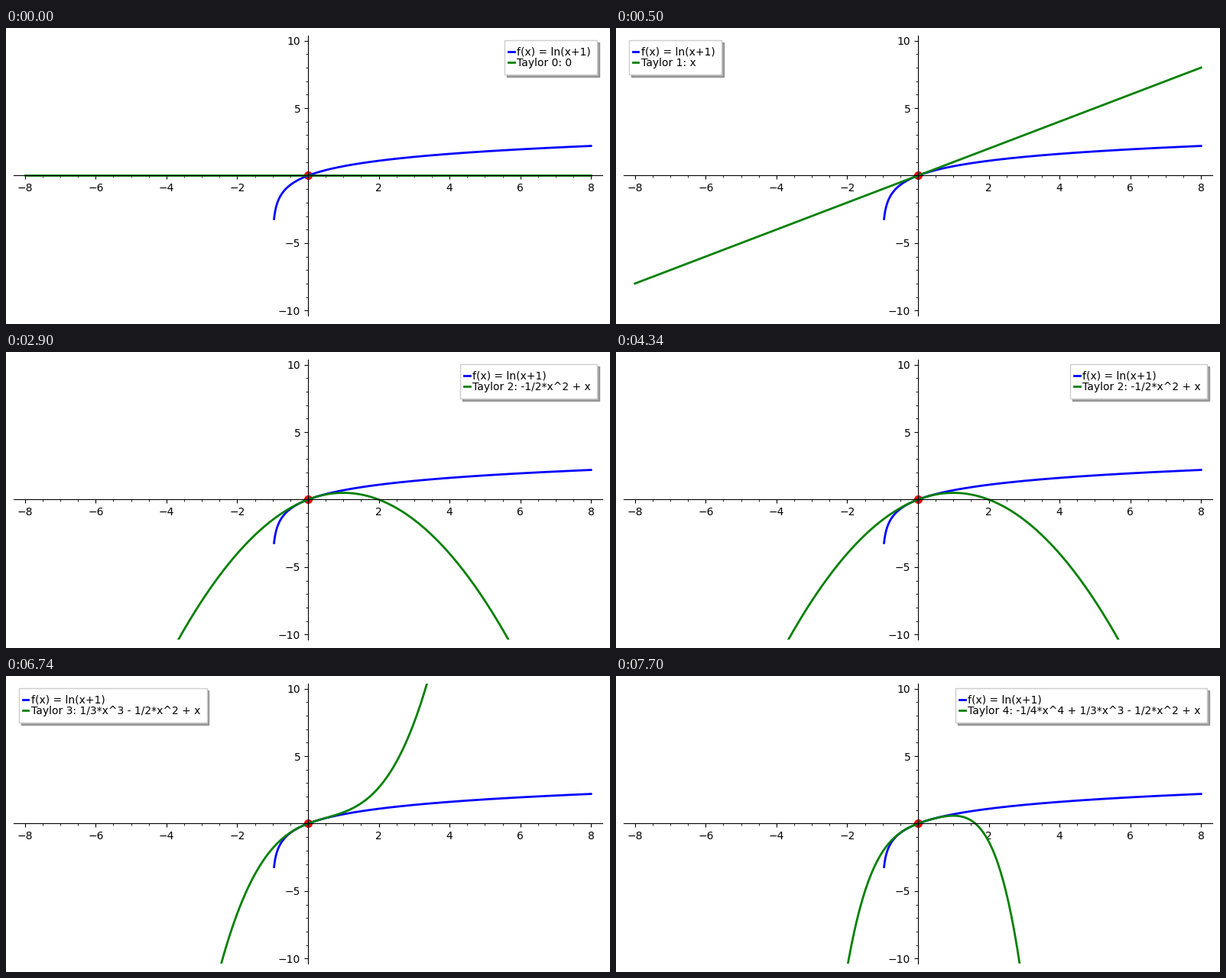
Animation of 790x388 px, one loop 8000 ms. Source, as a matplotlib script:

```python
import numpy as np
import matplotlib.pyplot as plt
from matplotlib.animation import FuncAnimation
from matplotlib.ticker import AutoMinorLocator, MultipleLocator

W, H, DPI = 790, 388, 100
STEP_MS, LOOP_MS = 100, 8000
HOLD_MS, LEAD_MS = 2400, 1900  # time per degree; part of the first hold already past

plt.rcParams["font.family"] = "DejaVu Sans"


def coef(k):
    return (-1) ** (k + 1) / k


def taylor(x, degree):
    return sum((coef(k) * x**k for k in range(1, degree + 1)), np.zeros_like(x))


def formula(degree):
    """Polynomial as text, highest power first."""
    text = ""
    for k in range(degree, 0, -1):
        term = "x" if k == 1 else f"1/{k}*x^{k}"
        negative = coef(k) < 0
        if text:
            text += (" - " if negative else " + ") + term
        else:
            text = "-" * negative + term
    return text or "0"


def tick_label(value, _):
    return f"{value:g}".replace("-", "\u2212") if value else ""


def setup_axis(axis, step):
    axis.set_major_locator(MultipleLocator(step))
    axis.set_minor_locator(AutoMinorLocator())
    axis.set_major_formatter(tick_label)


fig = plt.figure(figsize=(W / DPI, H / DPI), dpi=DPI, facecolor="white")
ax = fig.add_axes([10 / W, 10.6 / H, 770 / W, 367.9 / H])
ax.set(xlim=(-8.32, 8.32), ylim=(-10.4, 10.4))
for side in ("left", "bottom"):
    ax.spines[side].set_position("zero")
for side in ("right", "top"):
    ax.spines[side].set_visible(False)
setup_axis(ax.xaxis, 2)
setup_axis(ax.yaxis, 5)

# Denser samples near the steep left end of the logarithm
log_x = np.geomspace(0.04, 9, 400) - 1
poly_x = np.linspace(-8, 8, 401)

ax.scatter([0], [0], s=50, color="red", zorder=1)
ax.plot(log_x, np.log(log_x + 1), color="blue", lw=2, label="f(x) = ln(x+1)")
poly, = ax.plot(poly_x, 0 * poly_x, color="green", lw=2)


def update(i):
    degree = (i * STEP_MS + LEAD_MS) // HOLD_MS
    poly.set_ydata(taylor(poly_x, degree))
    poly.set_label(f"Taylor {degree}: {formula(degree)}")
    ax.legend(
        loc="upper left" if degree % 2 else "upper right",
        fontsize=10, numpoints=2, handlelength=0.05, handletextpad=0.5,
        labelspacing=0.02, borderpad=0.6, fancybox=False, shadow=True,
        facecolor="white",
    )
    return []


anim = FuncAnimation(fig, update, frames=LOOP_MS // STEP_MS, interval=STEP_MS,
                     repeat=True, repeat_delay=0)
plt.show()
```
